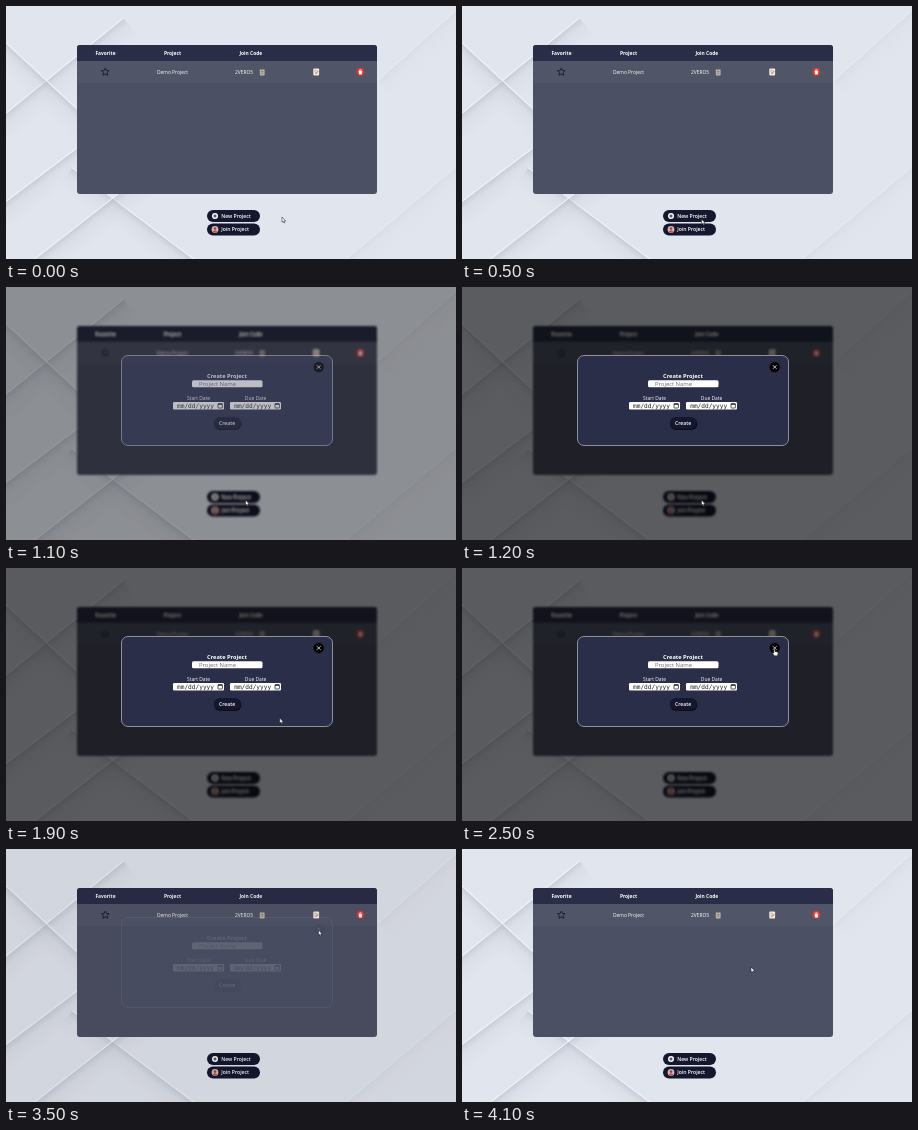
Write an HTML page that moves like this. It is 450x253 px and loops after 4800 ms.

```html
<!DOCTYPE html>
<html lang="en">
<head>
<meta charset="utf-8">
<title>Create Project</title>
<style>
html, body { margin: 0; height: 100%; overflow: hidden; background: #e1e5ed; }
svg { display: block; width: 100vw; height: 100vh; font: 4.9px "Open Sans", "Noto Sans", sans-serif; fill: #fff; }
.mid { text-anchor: middle; }
.bold { font-weight: 700; }
.semi { font-weight: 600; }
.date { font: 6.15px "DejaVu Sans Mono", monospace; fill: #222; }
.line { fill: none; stroke: #fff; stroke-width: .8; }
</style>
</head>
<body>
<svg viewBox="0 0 450 253" preserveAspectRatio="none">
  <defs>
    <linearGradient id="fall" x1="0" y1="0" x2="0" y2="1">
      <stop offset="0" stop-color="#aeb4c2" stop-opacity=".5"/>
      <stop offset=".3" stop-color="#bcc2ce" stop-opacity=".18"/>
      <stop offset="1" stop-color="#c8cdd8" stop-opacity="0"/>
    </linearGradient>
    <filter id="soft" x="0" y="0" width="450" height="253" filterUnits="userSpaceOnUse">
      <feGaussianBlur stdDeviation=".9"/>
    </filter>
    <g id="strip">
      <rect width="190" height="24" fill="url(#fall)"/>
      <rect y="-.9" width="190" height="1" fill="#f3f5f9"/>
    </g>
    <g id="calendar">
      <rect width="4.4" height="4.4" rx=".5" fill="none" stroke="#111" stroke-width=".7"/>
      <path d="M0 .6h4.4" stroke="#111"/>
    </g>
  </defs>

  <rect width="450" height="253" fill="#e1e5ed"/>
  <g id="paper">
    <use href="#strip" transform="translate(-30 132) rotate(-39)"/>
    <use href="#strip" transform="translate(-10 28) rotate(43)"/>
    <use href="#strip" transform="translate(-20 211) rotate(-37)"/>
    <use href="#strip" transform="translate(66 162) rotate(37)"/>
    <use href="#strip" transform="translate(18 262) rotate(-38)"/>
  </g>
  <g id="edge" opacity=".3">
    <use href="#strip" transform="translate(372 75) rotate(-42)"/>
    <use href="#strip" transform="translate(330 262) rotate(-40)"/>
  </g>

  <g id="page">
    <rect x="71" y="39" width="300" height="149" rx="3" fill="#4c5064"/>
    <path d="M71 55V42q0-3 3-3H368q3 0 3 3V55z" fill="#2a2d47"/>
    <rect x="71" y="55" width="300" height="22" fill="#515568"/>
    <g class="mid">
      <g class="bold">
        <text x="99.5" y="48.5">Favorite</text>
        <text x="166.5" y="48.5">Project</text>
        <text x="244.8" y="48.5">Join Code</text>
      </g>
      <text x="166.5" y="67.8">Demo Project</text>
      <text x="238" y="67.8">2VERO5</text>
    </g>
    <path id="star" fill="none" stroke="#171a30" stroke-width=".9" stroke-linejoin="round"/>

    <rect x="253.8" y="63.3" width="4.8" height="6.2" rx=".8" fill="#b9b3a4"/>
    <path d="M255 63.4h2.4M255 65.5h2.4M255 67.2h2.4" stroke="#6d6c70" stroke-width=".7"/>

    <rect x="307.3" y="62.4" width="5.8" height="7" rx="1" fill="#f2eee6"/>
    <path d="M308.5 64.3h2.4M308.5 66h1.4" stroke="#8d8988" stroke-width=".6"/>
    <path d="M309.4 68.2l2.8-3" stroke="#e0883c" stroke-width="1.2"/>

    <circle cx="354.4" cy="65.8" r="4" fill="#d8352f"/>
    <path d="M352.5 64.2h3.8M353.6 63.4h1.6M352.9 65.1h3l-.3 3.1h-2.4z" fill="#fff" stroke="#fff" stroke-width=".5"/>

    <g class="semi" font-size="5.1">
      <rect x="201" y="204" width="53" height="12" rx="6" fill="#14172e"/>
      <circle cx="209" cy="210" r="3"/>
      <path d="M207.3 210h3.4M209 208.3v3.4" stroke="#14172e" stroke-width=".9"/>
      <text x="215.2" y="211.9">New Project</text>
      <rect x="201" y="217.5" width="53" height="12" rx="6" fill="#14172e"/>
      <circle cx="209" cy="223.5" r="3.4" fill="#d9b4b0"/>
      <circle cx="209" cy="222.6" r="1.3" fill="#8c4a4c"/>
      <path d="M206.6 225.8q2.4-3 4.8 0q-2.4 2-4.8 0" fill="#b9504e"/>
      <text x="215.2" y="225.4">Join Project</text>
    </g>
  </g>

  <g id="dialog">
    <rect width="450" height="253" fill="#000" opacity=".6"/>
    <rect x="115.5" y="68.5" width="211" height="90" rx="6.5" fill="#2b2e48" stroke="#8d909f"/>
    <circle cx="312.7" cy="80" r="5.2" fill="#000"/>
    <path class="line" d="M310.9 78.2l3.6 3.6m0-3.6l-3.6 3.6"/>
    <text class="mid bold" x="221" y="91.4" font-size="5.65">Create Project</text>
    <rect x="186" y="93.2" width="70.5" height="7" rx="1.5"/>
    <text x="193" y="98.9" font-size="5.9" fill="#6f6f74">Project Name</text>
    <text class="mid" x="192.5" y="113.2">Start Date</text>
    <text class="mid" x="249.5" y="113.2">Due Date</text>
    <rect x="167" y="115" width="51" height="7.6" rx="1.3"/>
    <rect x="224" y="115" width="51" height="7.6" rx="1.3"/>
    <text class="date" x="171" y="120.9">mm/dd/yyyy</text>
    <text class="date" x="228.2" y="120.9">mm/dd/yyyy</text>
    <use href="#calendar" x="212" y="116.6"/>
    <use href="#calendar" x="269" y="116.6"/>
    <rect x="208" y="131" width="27.5" height="12" rx="6" fill="#0c0e1e"/>
    <rect x="207.8" y="130" width="27" height="11.7" rx="5.8" fill="#14172e"/>
    <text class="mid semi" x="221" y="137.7" font-size="5.1">Create</text>
  </g>

  <g id="cursor" stroke="#111" stroke-width=".5" stroke-linejoin="round">
    <path id="arrow" d="M0 0V5.2L1.2 4.2L2 6L2.9 5.6L2.1 3.9H3.7Z"/>
    <path id="hand" d="M-.6 .4q.6-.8 1.2 0V2.4L3 3q.7.3.5 1.2L3 6.8H-.2L-2 4.3q0-.9.8-.6L-.6 4.2Z"/>
  </g>
</svg>
<script>
const LOOP = 4800, STEP = 100;
const $ = id => document.getElementById(id);
const clamp = u => Math.min(1, Math.max(0, u));
const smooth = u => u * u * (3 - 2 * u);
const ramp = (t, start, span) => smooth(clamp((t - start) / span));

// time, x, y of the pointer tip
const path = [
  [0, 276, 211], [250, 254, 217], [500, 239.5, 213],
  [1600, 239.5, 213], [2200, 308, 87], [2500, 312.5, 81],
  [3500, 312.5, 81], [3900, 292, 109], [4100, 289, 118], [LOOP, 289, 118]
];

function pointer(t) {
  const i = path.findIndex(p => p[0] > t);
  const [t0, x0, y0] = path[i - 1], [t1, x1, y1] = path[i];
  const u = smooth((t - t0) / (t1 - t0));
  return [x0 + (x1 - x0) * u, y0 + (y1 - y0) * u];
}

const points = Array.from({ length: 10 }, (_, i) => {
  const r = i % 2 ? 1.9 : 4, a = i * Math.PI / 5;
  return [99.3 + r * Math.sin(a), 66 - r * Math.cos(a)];
});
$("star").setAttribute("d", "M" + points.join("L") + "Z");

function draw(now) {
  const t = Math.floor(now % LOOP / STEP) * STEP;
  const shown = ramp(t, 948, 260) - ramp(t, 3284, 270);
  $("dialog").setAttribute("opacity", shown);
  $("page").setAttribute("filter", t >= 900 && t < 3400 ? "url(#soft)" : "none");
  $("cursor").setAttribute("transform", `translate(${pointer(t)})`);
  const onClose = t >= 2300 && t < 3400;
  $("hand").style.display = onClose ? "" : "none";
  $("arrow").style.display = onClose ? "none" : "";
}

const start = performance.now();
function tick() {
  draw(performance.now() - start);
  requestAnimationFrame(tick);
}
tick();
</script>
</body>
</html>
```
